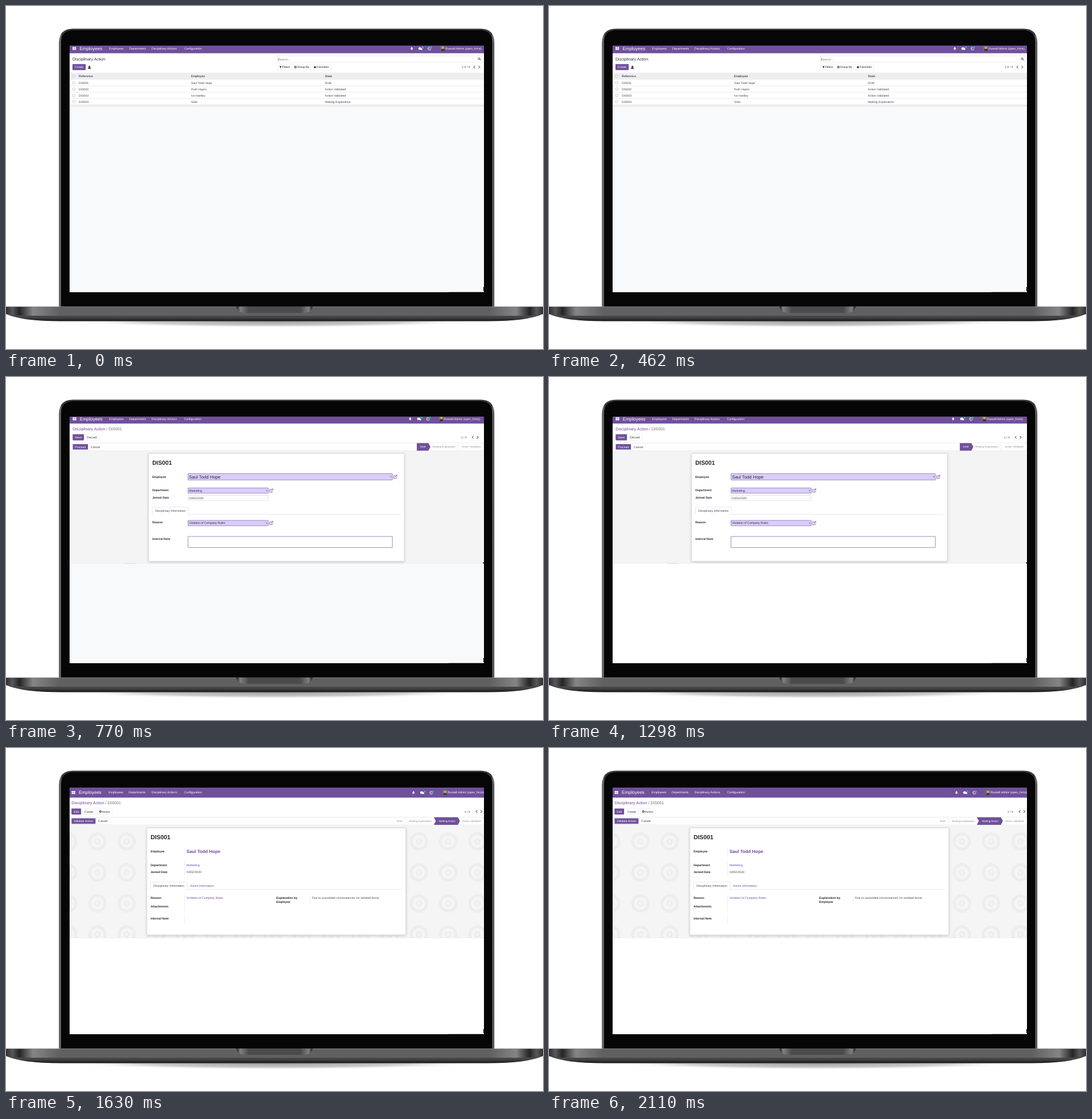
These frames come from a looping animation (937x598 px, 2.43 s). An HTML page:

```html
<!DOCTYPE html>
<html lang="en">
<head>
<meta charset="utf-8">
<title>Disciplinary Action</title>
<style>
  html, body { margin: 0; width: 100%; height: 100%; overflow: hidden; background: #fff; }
  svg { display: block; width: 937px; height: 598px; }
  text { font-family: "Liberation Sans", Arial, sans-serif; text-rendering: geometricPrecision; white-space: pre; }
</style>
</head>
<body>
<svg viewBox="0 0 937 598" xmlns="http://www.w3.org/2000/svg">
  <defs>
    <clipPath id="screen"><path d="M111 69H834V499H111Z"/></clipPath>
    <linearGradient id="rim">
      <stop offset="0" stop-color="#2c2c2e"/><stop offset=".003" stop-color="#77777a"/>
      <stop offset=".006" stop-color="#3a3a3c"/><stop offset=".994" stop-color="#3a3a3c"/>
      <stop offset=".997" stop-color="#77777a"/><stop offset="1" stop-color="#2c2c2e"/>
    </linearGradient>
    <linearGradient id="deck">
      <stop offset="0" stop-color="#303032"/><stop offset=".012" stop-color="#58585a"/>
      <stop offset=".025" stop-color="#242426"/><stop offset=".05" stop-color="#858587"/>
      <stop offset=".1" stop-color="#606062"/><stop offset=".9" stop-color="#606062"/>
      <stop offset=".95" stop-color="#858587"/><stop offset=".975" stop-color="#242426"/>
      <stop offset=".988" stop-color="#58585a"/><stop offset="1" stop-color="#303032"/>
    </linearGradient>
    <linearGradient id="under" x2="0" y2="1">
      <stop offset="0" stop-color="#4c4c4e"/><stop offset=".5" stop-color="#434345"/><stop offset="1" stop-color="#161617"/>
    </linearGradient>
    <linearGradient id="notch">
      <stop offset="0" stop-color="#1c1c1e"/><stop offset=".05" stop-color="#808082"/>
      <stop offset=".16" stop-color="#4b4b4d"/><stop offset=".84" stop-color="#4b4b4d"/>
      <stop offset=".95" stop-color="#808082"/><stop offset="1" stop-color="#1c1c1e"/>
    </linearGradient>
    <radialGradient id="floor">
      <stop offset="0" stop-color="#999"/><stop offset=".65" stop-color="#ccc"/><stop offset="1" stop-color="#fff" stop-opacity="0"/>
    </radialGradient>
    <filter id="shade" x="-5%" y="-8%" width="110%" height="116%">
      <feDropShadow dx="0" dy="1" stdDeviation="2.2" flood-color="#000" flood-opacity=".24"/>
    </filter>
    <pattern id="petals" x="134" y="136" width="51" height="54" patternUnits="userSpaceOnUse">
      <g fill="none" stroke="#ededed" stroke-width="5">
        <circle cx="25.5" cy="27" r="13.5"/><circle cx="25.5" cy="27" r="4" stroke-width="3"/>
      </g>
    </pattern>
  </defs>
  <ellipse cx="468" cy="549" rx="365" ry="12" fill="url(#floor)"/>
  <path d="M92.5 524V64Q92.5 39.5 117 39.5H828Q852 39.5 852 64V524Z" fill="url(#rim)"/>
  <path d="M96 524V64Q96 42 118 42H827Q848.5 42 848.5 64V524Z" fill="#060606"/>
  <path d="M0 537Q28 549.5 96 549.5H841Q909 549.5 937 537Z" fill="url(#under)"/>
  <path d="M0 524H937V537Q925 540 880 540H57Q12 540 0 537Z" fill="url(#deck)"/>
  <path d="M0 524.3H937" stroke="#919193" stroke-width=".7"/>
  <path d="M402 524H535Q533 535 518 535H419Q404 535 402 524Z" fill="url(#notch)"/>
  <g clip-path="url(#screen)">
    <rect id="page" x="111" y="69" width="723" height="430"/>
    <g id="list"></g>
    <g id="edit"></g>
    <g id="review"></g>
  </g>
  <path d="M772 498.7H834V500H772ZM833 490H835V497H833Z" fill="#060606"/>
</svg>
<script>
const LOOP = 2430, OPEN = 770, BLANK = 800, SUBMITTED = 1630;
const PURPLE = '#70509b', LINK = '#71479b', INK = '#44474d', DARK = '#1f2430', MUTED = '#8d9096', LINE = '#dcdee2';
const PERSON = 'Saul Todd Hope';
const $ = id => document.getElementById(id);

// y is the middle of the capitals
const text = (x, y, s, size = 5.13, fill = INK, extra = '') =>
  `<text x="${x}" y="${(y + size * .355).toFixed(2)}" font-size="${size}" fill="${fill}" ${extra}>${s}</text>`;
const bold = (x, y, s, size = 5.13, fill = DARK) => text(x, y, s, size, fill, 'font-weight="700"');
const mid = (x, y, s, fill = INK, size = 5.13) => text(x, y, s, size, fill, 'text-anchor="middle"');
const box = (x, y, x2, y2, fill, stroke = 'none', r = 0, w = .6) =>
  `<rect x="${x}" y="${y}" width="${x2 - x}" height="${y2 - y}" rx="${r}" fill="${fill}" stroke="${stroke}" stroke-width="${w}"/>`;
const path = (d, stroke = LINE, w = .6, fill = 'none') =>
  `<path d="${d}" stroke="${stroke}" stroke-width="${w}" fill="${fill}"/>`;
const dot = (x, y, r, fill, stroke = 'none', w = .8) =>
  `<circle cx="${x}" cy="${y}" r="${r}" fill="${fill}" stroke="${stroke}" stroke-width="${w}"/>`;
const at = (x, y, s) => `<g transform="translate(${x} ${y})">${s}</g>`;

function button(x, x2, y, label, main = false) {
  return box(x, y - 5.3, x2, y + 5.3, main ? PURPLE : '#fff', main ? 'none' : '#e6e7ea', .8) +
    mid((x + x2) / 2, y, label, main ? '#fff' : '#33363c');
}

function pager(x, y, label, left, right) {
  const arrow = (cx, s) => path(`M${cx + s} ${y - 2.3}l${-2 * s} 2.3l${2 * s} 2.3`, '#222', 1);
  return text(x, y, label) + box(left - 4, y - 5.3, right + 4, y + 5.3, 'none', '#eceef0') +
    arrow(left, 1.1) + arrow(right, -1.1);
}

function nav({ y, bottom, grid, title, menus, bug, chat, clock, face, user, size = 5.13 }) {
  const names = ['Employees', 'Departments', 'Disciplinary Actions', 'Configuration'];
  const badge = (x, dy) => dot(x, y + dy, 2.1, '#1d9c8b') + mid(x, y + dy, '5', '#fff', 2.6);
  const cells = [0, 3.3].map(a => [-2.5, .3].map(b =>
    box(grid + a, y + b, grid + a + 2.9, y + b + 2.3, '#fff', 'none', .2)).join('')).join('');
  return box(111, 69, 834, bottom, PURPLE) + cells +
    text(title, y, 'Employees', 8, '#fff') +
    names.map((s, i) => text(menus[i], y, s, size, '#fff')).join('') +
    at(bug, y, '<ellipse cy=".5" rx="1.4" ry="1.9" fill="#fff"/>' + dot(0, -1.3, 1, '#fff') +
      path('M-2.1 -.8L2.1 1.7M2.1 -.8L-2.1 1.7', '#fff', .5)) +
    at(chat, y, '<ellipse cx="-.6" rx="2.7" ry="2" fill="#fff"/><ellipse cx="1.4" cy="1" rx="2.2" ry="1.6" fill="#fff"/>' +
      path('M-2.6 .8v2l2 -1M2.4 2l1.3 1l-.4 -2', 'none', 0, '#fff')) +
    badge(chat + 4.5, -1.6) +
    at(clock, y, dot(0, .3, 2.5, 'none', '#fff') + path('M0 -1.2V.5H-1.2', '#fff', .6)) +
    badge(clock + 3, -1.8) +
    at(face, y, box(-4, -4.2, 4, 4.2, '#77795f', 'none', 1) + path('M-3 4.2Q-3 .8 .3 .8T3.5 4.2Z', 'none', 0, '#3b332e') +
      dot(.3, -1.2, 2, '#c8a58b')) +
    text(user, y, 'Russell Admin (open_hrms)', size, '#fff');
}

function crumbs(x, y) {
  return text(x, y, `Disciplinary Action<tspan fill="#6d7076"> / DIS001</tspan>`, 7.02, LINK);
}

function steps(y, items, arrow) {
  const [a, b] = arrow;
  return path(`M${a} ${y - 6.6}H${b - 3.5}L${b} ${y}L${b - 3.5} ${y + 6.6}H${a}${a > 720 ? `L${a + 3.5} ${y}` : ''}Z`, 'none', 0, PURPLE) +
    items.map(([x, s, on]) => text(x, y, s, 4.57, on ? '#fff' : MUTED)).join('');
}

const chevron = (x, y) => path(`M${x - 3} ${y - 6.6}l3.5 6.6l-3.5 6.6`, LINE, .5);
const caret = (x, y) => path(`M${x - 1.3} ${y - .6}h2.6l-1.3 1.5Z`, 'none', 0, '#4b4660');
const outlink = (x, y) => at(x, y, path('M.8 -1.8H-2.8V2.8H1.8V.4', LINK, .8) + path('M-.8 .8L3 -2.8M.8 -2.9H3.1V-.6', LINK, .8));
const gear = (x, y) => dot(x, y, 1.3, 'none', '#222', 1) +
  `<circle cx="${x}" cy="${y}" r="2" fill="none" stroke="#222" stroke-width=".7" stroke-dasharray=".79 .78"/>`;

function select(x, x2, y, y2, label, size) {
  return box(x, y, x2, y2, '#d9cdfb', '#8876b4', .4, .8) + text(x + 1.7, (y + y2) / 2, label, size, '#27232f') +
    caret(x2 - 3, (y + y2) / 2) + outlink(x2 + 5, (y + y2) / 2);
}

function sheet(x, y, x2, y2) {
  return `<g filter="url(#shade)">${box(x, y, x2, y2, '#fff', '#d3d4d8')}</g>`;
}

function tab(x, x2, y, y2, end) {
  return path(`M${x} ${y2}V${y}H${x2}V${y2}H${end}`, LINE, .7);
}

function listView() {
  const rows = [[PERSON, 'Draft'], ['Ruth Hayes', 'Action Validated'],
    ['Ivo Hartley', 'Action Validated'], ['Silas', 'Waiting Explanation']];
  const check = y => box(116.3, y - 2, 120.3, y + 2, '#fff', '#a9abb0', .7, .6);
  const cols = [127, 323, 556.5];
  return nav({ y: 74, bottom: 82.6, grid: 116, title: 128.4, menus: [180, 215, 254, 311],
      bug: 708, chat: 722.8, clock: 738.7, face: 762, user: 767 }) +
    box(111, 82.6, 834, 172, '#fff') +
    text(116, 92, 'Disciplinary Action', 7.04, '#2b2f38') +
    button(116, 139, 106.5, 'Create', true) +
    path('M144.5 104.2h2v1.7h1.5l-2.5 2.4l-2.5 -2.4h1.5ZM143 108h5v1.5h-5Z', 'none', 0, '#222') +
    box(473.3, 87, 830.8, 98, '#fff', '#dddfe4') + path('M475.3 90.3v5', '#333', .5) +
    text(475.6, 92.8, 'Search...', 5.13, '#777b82') +
    dot(825.5, 91.9, 1.6, 'none', '#222') + path('M826.6 93l1.7 1.8', '#222', 1) +
    box(473.3, 101.2, 566.5, 111.8, '#fff', '#e6e7ea') + path('M499.5 101.2V111.8M532.5 101.2V111.8', '#eceef0', .5) +
    path('M477 104.7h4l-1.4 1.7v2.3l-1.2 -.8v-1.5Z', 'none', 0, '#222') + text(481.8, 106.5, 'Filters', 5.13, '#222') +
    path('M503 105h3.8M503 106.5h3.8M503 108h3.8', '#222', .8) + text(507.5, 106.5, 'Group By', 5.13, '#222') +
    path('M539 104.1l.75 1.55l1.7 .2l-1.25 1.2l.3 1.7l-1.5 -.85l-1.5 .85l.3 -1.7l-1.25 -1.2l1.7 -.2Z', 'none', 0, '#222') +
    text(542, 106.5, 'Favorites', 5.13, '#222') +
    pager(795, 106.5, '1-4 / 4', 817.3, 825.7) +
    box(111, 116.3, 834, 128.5, '#eeeef0') + check(122.5) +
    ['Reference', 'Employee', 'State'].map((s, i) => bold(cols[i], 122.5, s, 5.13, '#484b52')).join('') +
    rows.map((r, i) => {
      const y = 133.7 + i * 11;
      return check(y + .2) + ['DIS00' + (i + 1), ...r].map((s, j) => text(cols[j], y, s)).join('') +
        path(`M111 ${y + 5.5}H834`, '#dfe1e4', .6);
    }).join('') +
    box(111, 172, 834, 175.6, '#ececee');
}

function editView() {
  return nav({ y: 72.8, bottom: 81.4, grid: 116.4, title: 128.8, menus: [180, 215, 253.8, 310.5],
      bug: 705.2, chat: 720.7, clock: 736.3, face: 759.3, user: 764 }) +
    box(111, 81.4, 834, 128.8, '#fff') + crumbs(116.2, 90.6) +
    button(116.3, 136, 105.1, 'Save', true) + button(137.3, 162, 105.1, 'Discard') +
    pager(794, 105.1, '1 / 4', 814.5, 823) +
    path('M111 115H834M111 128.6H834') +
    `<g>${box(116.5, 117, 143, 126.6, PURPLE, 'none', .6)}</g>` + mid(129.8, 121.8, 'Proceed', '#fff') +
    box(144, 117, 168.3, 126.6, '#fff', '#f0f0f2') + mid(156.1, 121.8, 'Cancel', '#33363c') +
    steps(121.8, [[722.5, 'Draft', 1], [744, 'Waiting Explanation'], [795.2, 'Action Validated']], [716.8, 740.5]) +
    chevron(790.5, 121.8) +
    box(111, 128.9, 834, 324.6, '#f4f4f5') + sheet(249, 133.7, 694.8, 321) +
    bold(255.2, 149, 'DIS001', 10.3) +
    bold(255.2, 174, 'Employee') + select(317.6, 674.2, 168.5, 179.6, PERSON, 7.75) +
    bold(255.2, 197.2, 'Department') + select(317.6, 457.6, 193.4, 202.6, 'Marketing') +
    bold(255.2, 209.9, 'Joined Date') + box(317.6, 206.5, 457.6, 215.3, '#fff', '#cfd0d5', .4) +
    text(319.3, 211, '03/02/2020') + path('M453.3 211h2', '#bbb', .6) +
    tab(255.2, 318, 227, 239.5, 688.5) + text(260.2, 233.3, 'Disciplinary Information') +
    bold(255.2, 253.6, 'Reason') + select(317.6, 457.6, 250, 259.3, 'Violation of Company Rules') +
    bold(255.2, 281.7, 'Internal Note') + box(317.6, 278, 674.2, 297.3, '#fff', '#8f81bb', .4, .9) +
    path('M111 324.7H834', '#e2e3e6', .6) + path('M206 325H226', '#c9c9cc', .6) + dot(833.3, 324.2, 1.1, '#111');
}

function reviewView() {
  const s = 5.19;
  return nav({ y: 77.6, bottom: 86.7, grid: 114.5, title: 127, menus: [179, 214, 253.8, 311],
      bug: 711, chat: 726, clock: 742, face: 765.8, user: 770.5, size: s }) +
    box(111, 86.7, 834, 134, '#fff') + crumbs(114.4, 95.9) +
    button(114.3, 131, 110.7, 'Edit', true) + button(133, 156, 110.7, 'Create') +
    box(158.4, 105.4, 185.2, 116, '#fff', '#e6e7ea', .8) + gear(164.6, 110.7) + text(167.2, 110.7, 'Action', s, '#33363c') +
    pager(800, 110.7, '1 / 4', 821.2, 829.4) +
    path('M111 120.6H834M111 134H834') +
    box(114.3, 122.4, 156.2, 132.2, PURPLE, '#c7b9df', .6) + mid(135.2, 127.3, 'Validate Action', '#fff', s) +
    box(157.3, 122.4, 181.5, 132.2, '#fff', '#f0f0f2') + mid(169.2, 127.3, 'Cancel', '#33363c', s) +
    steps(127.3, [[681.8, 'Draft'], [703, 'Waiting Explanation'], [755.2, 'Waiting Action', 1], [796, 'Action Validated']], [746.5, 792]) +
    chevron(698.5, 127.3) +
    box(111, 134.3, 834, 331, '#f5f5f5') + box(111, 134.3, 834, 331, 'url(#petals)') +
    sheet(246, 139.3, 697.5, 325.8) +
    bold(252.2, 155, 'DIS001', 10.4) +
    path('M311.5 173V188.5M311.5 198V222M311.5 256V284.5M311.5 291V306M531 256V272', '#dedfe3', .6) +
    bold(252.2, 180.2, 'Employee', s) + bold(315, 179.8, PERSON, 7.8, LINK) +
    bold(252.2, 203.7, 'Department', s) + text(315, 203.8, 'Marketing', s, LINK) +
    bold(252.2, 216.4, 'Joined Date', s) + text(315, 216.6, '03/02/2020', s) +
    tab(252.2, 316, 233.8, 246.7, 691) + text(257.2, 240.2, 'Disciplinary Information', s) +
    text(321, 240.2, 'Action Information', s, LINK) +
    bold(252.2, 261, 'Reason', s) + text(315, 261.3, 'Violation of Company Rules', s, LINK) +
    bold(252.2, 275.9, 'Attachments', s) + bold(252.2, 297, 'Internal Note', s) +
    bold(471.5, 260.9, 'Explanation by', s) + bold(471.5, 268.4, 'Employee', s) +
    text(534, 260.9, "Due to unavoided circumstances i'm violated those.", s) +
    path('M111 331H834', '#e2e3e6', .6);
}

$('list').innerHTML = listView();
$('edit').innerHTML = editView();
$('review').innerHTML = reviewView();

function draw(t) {
  const view = t < OPEN ? 'list' : t < SUBMITTED ? 'edit' : 'review';
  for (const id of ['list', 'edit', 'review']) $(id).setAttribute('display', id === view ? 'inline' : 'none');
  $('page').setAttribute('fill', t < BLANK ? '#f8f9fb' : '#fff');
}

const start = performance.now();
function tick() {
  draw((performance.now() - start) % LOOP);
  requestAnimationFrame(tick);
}
tick();
</script>
</body>
</html>
```
